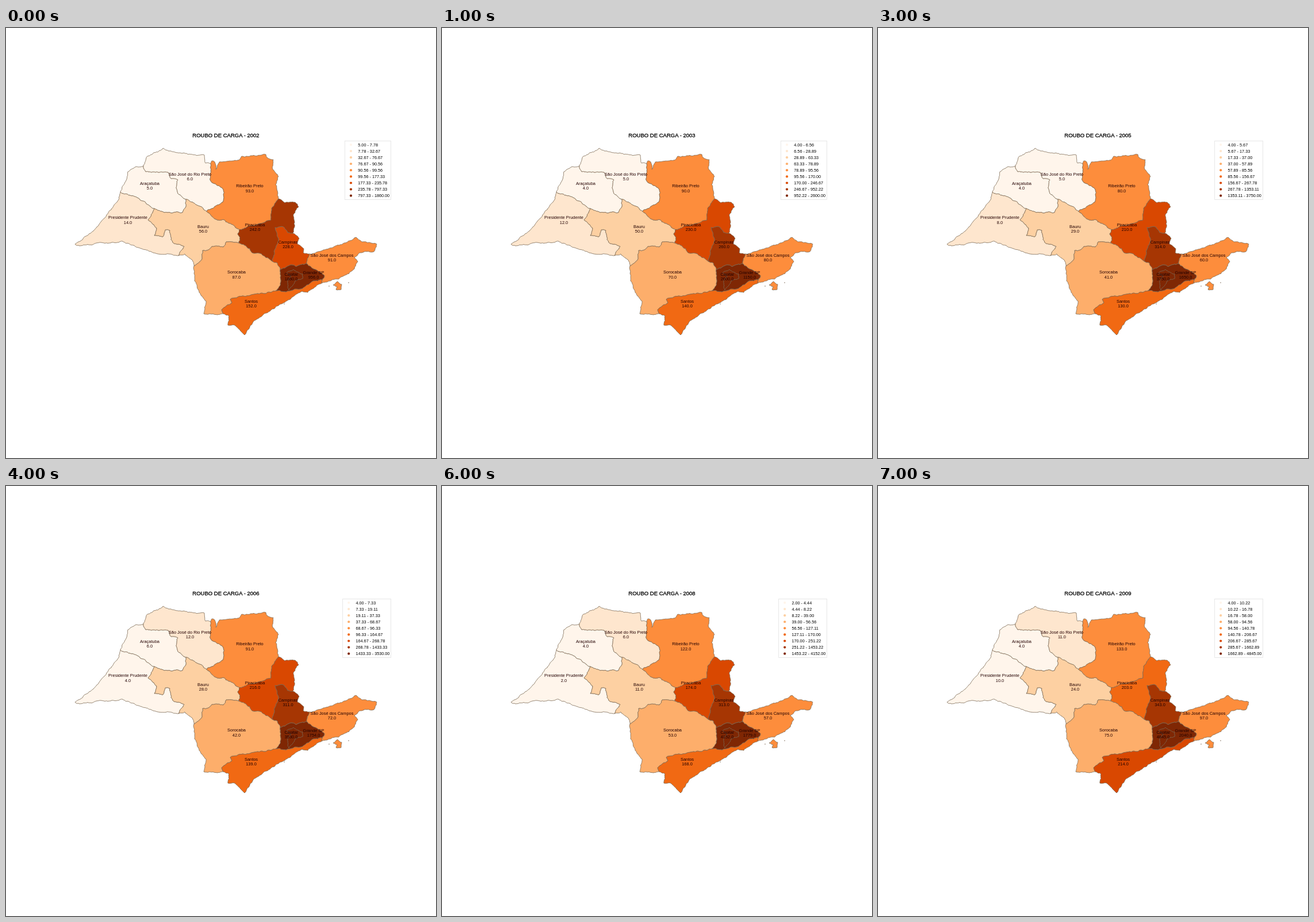
These frames come from a looping animation (748x748 px, 8000 ms). An HTML page:

```html
<!DOCTYPE html>
<html lang="pt">
<head>
<meta charset="utf-8">
<style>
  html, body { margin: 0; width: 100%; height: 100%; overflow: hidden; background: #fff; }
  svg { display: block; width: 748px; height: 748px; }
  text { font-family: "Liberation Sans", Arial, sans-serif; }
  .land path { stroke: #7b6a55; stroke-width: .8; stroke-linejoin: round; }
  .label { font-size: 7.45px; fill: #200; text-anchor: middle; }
  .legend { font-size: 7.25px; }
  .title { font-size: 9.53px; text-anchor: middle; stroke: #000; stroke-width: .3; }
</style>
</head>
<body>
<svg viewBox="0 0 748 748"></svg>
<script>
const COLORS = ['#fff5eb', '#fee6ce', '#fdd0a2', '#fdae6b', '#fd8d3c', '#f16913', '#d94801', '#a63603', '#7f2704'];

// Points where borders meet.
const JUNCTIONS = {
  A: '199,285', B: '239,240', C: '356,236', D: '349,319', E: '406,351', F: '474,297',
  G: '499,357', H: '463,406', I: '528,393', J: '523,410', K: '477,420', L: '405,374',
  M: '327,414', N: '300,396', P: '258,314', Q: '313,298', R: '378,497', S: '470,457',
  T: '550,438', U: '549,444', V: '492,456', W: '500,420', Y: '577,441', Z: '574,455'
};

// Key points of the border between two junctions.
const BORDERS = {
  AB: '208,267 212,250 224,242',
  BQ: '243,250 282,251 287,262 299,264 296,278 299,288',
  PQ: '275,321 307,321 313,311',
  AP: '228,295 243,304',
  BC: '246,223 273,209 283,214 345,221 347,235',
  CD: '356,266 378,281 377,303',
  QD: '330,307 340,311',
  CF: '358,231 363,233 365,246 371,233 407,228 410,223 452,220 455,226 465,229 464,246 474,258 469,272',
  EF: '419,346 461,334 462,314',
  DE: '366,333 380,334',
  AN: '193,303 173,329 158,346 120,376 128,379 165,373 203,371 256,391',
  PN: '247,334 262,348 258,361 273,363 277,351 285,352 290,373 310,380',
  EL: '403,358 407,364',
  LM: '383,372 378,381 358,380 352,386 342,387 341,402',
  MN: '325,406 311,393',
  FG: '485,304 503,303 509,311 500,324 502,346',
  GH: '490,356 484,347 468,347 474,366 467,392',
  LH: '424,384 428,391 441,392',
  GI: '510,366 507,376 518,384 517,391',
  IJ: '524,404',
  JK: '505,415 497,412',
  HK: '472,409',
  SK: '478,442',
  RS: '375,490 393,478 390,472 412,466 450,462',
  MR: '328,440 336,460 348,475 344,497',
  ST: '487,459 512,454 534,440',
  TU: '',
  RU: '388,501 386,517 398,517 415,534 429,513 483,478 515,458 525,460',
  JT: '538,420 554,431',
  IU: '552,386 588,374 609,364 619,372 645,376 640,389 615,391 606,399 612,406 606,419 578,437',
  VW: '490,440 496,432 488,426',
  WV: '516,428 516,436 503,440',
  YZ: '584,446 583,455',
  ZY: '576,450 569,447'
};

// name, label x, y, junctions around the outline
const REGIONS = [
  ['Araçatuba', 250, 270, 'ABQP'],
  ['São José do Rio Preto', 320, 254, 'BCDQ'],
  ['Presidente Prudente', 212, 329.5, 'ANP'],
  ['Bauru', 343, 345.3, 'QDELMNP'],
  ['Ribeirão Preto', 424, 274.5, 'CFED'],
  ['Piracicaba', 433, 342, 'EFGHL'],
  ['Campinas', 490.5, 372, 'GIJKH'],
  ['São José dos Campos', 567, 395, 'IUTJ', 'YZ'],
  ['Sorocaba', 401, 424.5, 'LHKSRM'],
  ['Santos', 426.5, 475, 'RSTU'],
  ['Grande SP', 535, 425, 'SKJT'],
  ['Capital', 496, 428, 'VW']
];

// One row per year from 2002, in the order of REGIONS.
const COUNTS = [
  [5, 6, 14, 56, 93, 242, 228, 91, 87, 152, 956, 1860],
  [4, 5, 12, 50, 90, 230, 260, 80, 70, 140, 1150, 2600],
  [3, 2, 2, 30, 74, 200, 316, 44, 39, 125, 1568, 3986],
  [4, 5, 8, 29, 80, 210, 314, 60, 41, 130, 1650, 3750],
  [6, 12, 4, 28, 91, 216, 311, 72, 42, 139, 1754, 3530],
  [2, 6, 9, 16, 98, 205, 317, 58, 74, 120, 1717, 3773],
  [4, 6, 2, 11, 122, 174, 313, 57, 53, 168, 1779, 4152],
  [4, 11, 10, 24, 133, 203, 343, 97, 75, 214, 2040, 4845]
];

const svg = document.querySelector('svg');

function add(tag, attrs, parent = svg) {
  const node = document.createElementNS('http://www.w3.org/2000/svg', tag);
  for (const key in attrs) node.setAttribute(key, attrs[key]);
  return parent.appendChild(node);
}

let seed = 7;
const random = () => (seed = seed * 16807 % 2147483647) / 2147483647;

// Points after a up to b, with midpoints pushed sideways for a ragged border.
function ragged(a, b) {
  const dx = b[0] - a[0], dy = b[1] - a[1], length = Math.hypot(dx, dy);
  if (length < 3.5) return [b];
  const push = (random() - .5) * Math.min(.3, 2.4 / length);
  const middle = [a[0] + dx / 2 - dy * push, a[1] + dy / 2 + dx * push];
  return [...ragged(a, middle), ...ragged(middle, b)];
}

const lines = {};
for (const key in BORDERS) {
  const points = [JUNCTIONS[key[0]], ...BORDERS[key].split(' '), JUNCTIONS[key[1]]]
    .filter(Boolean).map(p => p.split(',').map(Number));
  lines[key] = points.flatMap((p, i) => i ? ragged(points[i - 1], p) : [p]);
}

function outline(ring) {
  const points = [...ring].flatMap((from, i) => {
    const to = ring[(i + 1) % ring.length];
    return lines[from + to] || [...lines[to + from]].reverse();
  });
  return 'M' + points.map(p => p.map(v => v.toFixed(1))).join('L') + 'Z';
}

const land = add('g', { class: 'land' });
const shapes = REGIONS.map(([, , , ...rings]) => add('path', { d: rings.map(outline).join('') }, land));
for (const [cx, cy] of [[484, 480], [562, 449], [596, 443]]) add('circle', { cx, cy, r: .8, fill: '#7b6a55' }, land);

const values = REGIONS.map(([name, x, y]) => {
  add('text', { class: 'label', x, y: y + 2.7 }).textContent = name;
  return add('text', { class: 'label', x, y: y + 11.1 });
});
const title = add('text', { class: 'title', x: 382.5, y: 190 });

const frame = add('rect', { y: 196.5, height: 102, fill: '#fff', stroke: '#e2e2e2', 'stroke-width': .8 });
const rows = COLORS.map((fill, i) => {
  const y = 203 + i * 11.08;
  return {
    dot: add('circle', { cy: y, r: 2.1, fill }),
    text: add('text', { class: 'legend', y: y + 2.5 })
  };
});

function quantile(sorted, q) {
  const at = q * (sorted.length - 1), i = Math.floor(at);
  return i + 1 < sorted.length ? sorted[i] + (at - i) * (sorted[i + 1] - sorted[i]) : sorted[i];
}

function show(year) {
  const counts = COUNTS[year];
  const sorted = [...counts].sort((a, b) => a - b);
  const limits = COLORS.map((_, i) => quantile(sorted, i / 9)).concat(sorted.at(-1));
  title.textContent = 'ROUBO DE CARGA - ' + (2002 + year);
  counts.forEach((count, i) => {
    const rank = limits.slice(1, 9).filter(limit => limit < count).length;
    shapes[i].setAttribute('fill', COLORS[rank]);
    values[i].textContent = count.toFixed(1);
  });
  const left = limits[8] < 1000 ? 589.5 : 585.7;
  frame.setAttribute('x', left);
  frame.setAttribute('width', 669.5 - left);
  rows.forEach(({ dot, text }, i) => {
    dot.setAttribute('cx', left + 10.5);
    text.setAttribute('x', left + 22.8);
    text.textContent = limits[i].toFixed(2) + ' - ' + limits[i + 1].toFixed(2);
  });
}

let shown = -1;
function tick() {
  const year = Math.floor(performance.now() / 1000) % COUNTS.length;
  if (year !== shown) show(shown = year);
  requestAnimationFrame(tick);
}
tick();
</script>
</body>
</html>
```
